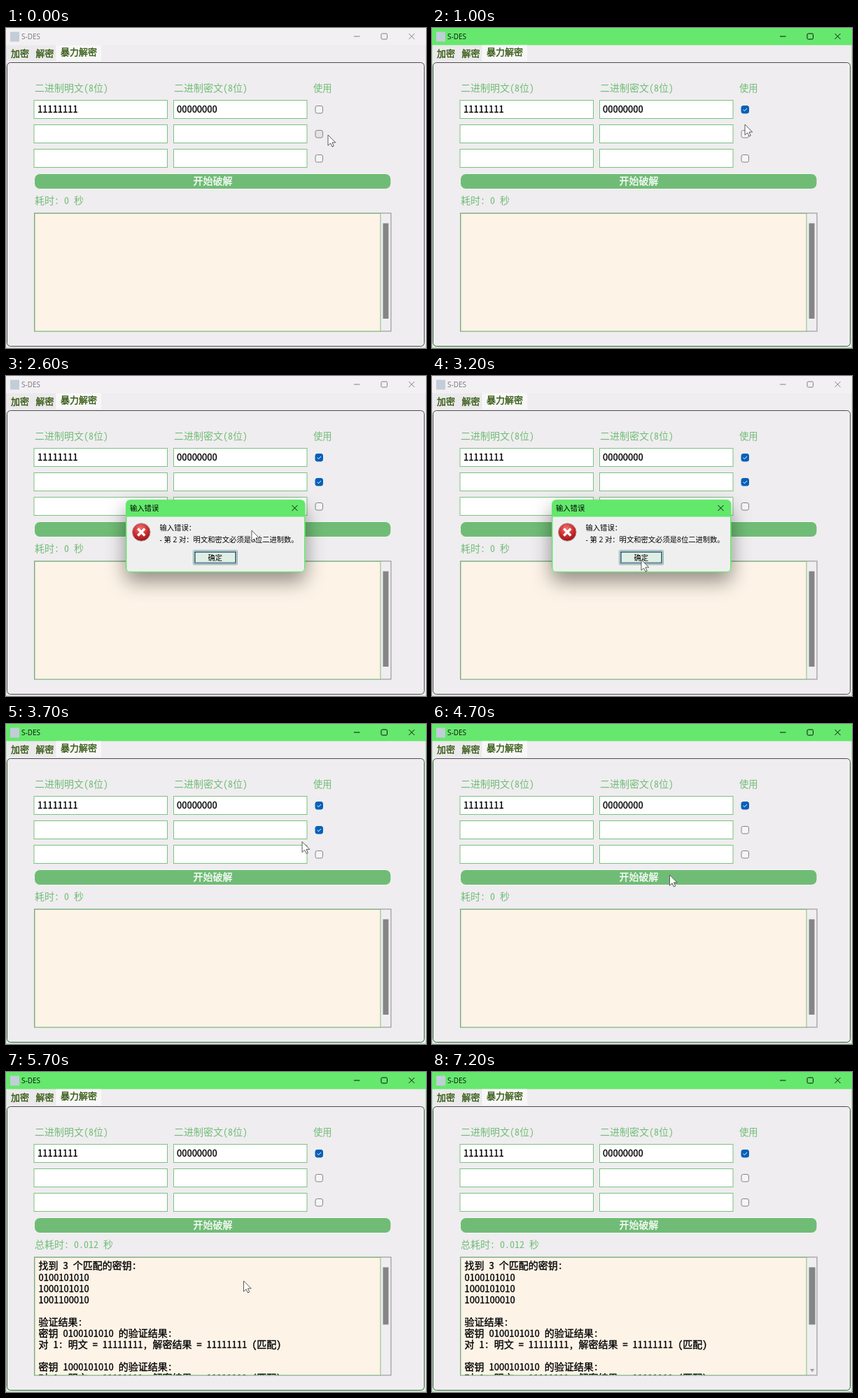
An HTML page for the animation above (7300 ms loop, 600x458 px).

```html
<!DOCTYPE html>
<html lang="zh">
<head>
<meta charset="utf-8">
<title>S-DES</title>
<style>
html, body { margin: 0; width: 100%; height: 100%; overflow: hidden; background: #efedef; }
svg { display: block; width: 100vw; height: 100vh; }
text { white-space: pre; font: 400 14px "Noto Sans Mono CJK SC", "Noto Sans CJK SC", "Noto Sans CJK", monospace; }
.digits { font-family: "Noto Sans CJK SC", "Noto Sans CJK", sans-serif; font-size: 13px; }
.label { fill: #72bd78; }
.tab { font-size: 13px; fill: #355a14; stroke: #355a14; stroke-width: .4; }
.strong { stroke: #000; stroke-width: .35; }
.ui { font: 10.3px "Open Sans", "Noto Sans CJK SC", "Noto Sans CJK", sans-serif; }
.line { fill: none; stroke-width: 1; }
</style>
</head>
<body>
<svg viewBox="0 0 600 458" preserveAspectRatio="none">
  <defs>
    <clipPath id="view"><rect x="41" y="266" width="494" height="167.5"/></clipPath>
    <radialGradient id="red" cx=".45" cy=".3" r=".75">
      <stop offset="0" stop-color="#ee7672"/><stop offset=".55" stop-color="#cf2b2d"/><stop offset="1" stop-color="#8e1116"/>
    </radialGradient>
    <filter id="shadow" x="-30%" y="-40%" width="160%" height="220%">
      <feDropShadow dx="0" dy="13" stdDeviation="14" flood-color="#000" flood-opacity=".42"/>
    </filter>
  </defs>
  <rect width="600" height="458" fill="#efedef"/>
  <rect id="bar" width="600" height="24.5"/>
  <path id="edge" class="line" d="M.25 24V457.5H599.75V24" stroke-opacity=".6"/>
  <rect x="6" y="5.5" width="13" height="14" fill="#c3cdd8"/>
  <text id="caption" class="ui" x="22" y="16" style="font-size:10px">S-DES</text>
  <path id="controls" class="line" d="M497 12H505.5M575.5 8L583.5 16M583.5 8L575.5 16M537.5 8H543Q544.5 8 544.5 9.5V14.5Q544.5 16 543 16H537.5Q536 16 536 14.5V9.5Q536 8 537.5 8Z"/>

  <rect x="1" y="25" width="70" height="22" fill="#ebe9eb"/>
  <rect x="71.5" y="24.5" width="64.5" height="23" fill="#f8f7f8"/>
  <text class="tab" x="7" y="40.5">加密</text>
  <text class="tab" x="42.5" y="40.5">解密</text>
  <text class="tab" x="78" y="39">暴力解密</text>
  <rect class="line" x="1.5" y="49.5" width="596" height="406" rx="5" stroke="#4c4c4c"/>

  <text class="label" x="41" y="91">二进制明文(8位)</text>
  <text class="label" x="240" y="91">二进制密文(8位)</text>
  <text class="label" x="439" y="91" style="font-size:13.3px">使用</text>
  <g id="rows"></g>
  <text class="strong" x="45" y="120.7"><tspan class="digits">11111111</tspan></text>
  <text class="strong" x="244" y="120.7"><tspan class="digits">00000000</tspan></text>

  <rect id="crack" x="40.5" y="208.5" width="509.5" height="22" rx="8" stroke="#f8f8f8"/>
  <text x="267.5" y="224" fill="#fff" stroke="#fff" stroke-width=".3">开始破解</text>
  <text id="cost" class="label" x="41" y="252"></text>

  <rect x="40.5" y="265" width="509.5" height="169" fill="#f0eef0" stroke="#8b8b8b"/>
  <rect x="41" y="265.5" width="494" height="168.5" fill="#fdf3e7" stroke="#7cc182"/>
  <g clip-path="url(#view)"><g id="output"></g></g>
  <rect id="thumb" x="538.5" fill="#858585"/>
  <path id="down" d="M540 425H546.4L543.2 429.5Z" fill="#a0a0a0"/>

  <g id="dialog">
    <rect x="171" y="177" width="256.5" height="104" rx="6.5" fill="#62e86b" filter="url(#shadow)"/>
    <path d="M172.5 201.5H426V275Q426 279.7 421.5 279.7H177Q172.5 279.7 172.5 275Z" fill="#f0eff0"/>
    <text class="ui" x="177" y="192.7">输入错误</text>
    <path class="line" d="M408.5 185L416.5 193M416.5 185L408.5 193" stroke="#111"/>
    <circle cx="193.3" cy="223.5" r="12.8" fill="url(#red)" stroke="#a9a5a5"/>
    <path d="M188.3 218.5L198.3 228.5M198.3 218.5L188.3 228.5" stroke="#fff" stroke-width="3.4"/>
    <text class="ui" x="219.5" y="221">输入错误：</text>
    <text class="ui" x="219.5" y="238">- 第 2 对：明文和密文必须是8位二进制数。</text>
    <rect x="267.5" y="249.5" width="63" height="20.5" rx="1" fill="#e0efe5" stroke="#88aa95"/>
    <rect class="line" x="269.5" y="251.5" width="59" height="16.5" stroke="#2869a5"/>
    <rect class="line" x="270.5" y="252.5" width="57" height="14.5" stroke="#222" stroke-dasharray="1 1"/>
    <text class="ui" x="288.5" y="263.7">确定</text>
  </g>
  <path id="cursor" d="M0 0V15.2L3.6 11.9L6 17L8.3 16L6 10.9H10.8Z" fill="#fff" stroke="#4a4a4a" stroke-width=".9"/>
</svg>
<script>
const LOOP = 7300, STEP = 100, LINE = 16.1, MAX_SCROLL = 96;
const $ = id => document.getElementById(id);
const set = (el, attrs) => { for (const k in attrs) el.setAttribute(k, attrs[k]); };
const show = (el, on) => set(el, { visibility: on ? 'visible' : 'hidden' });
function add(parent, tag, attrs, text = '') {
  const el = document.createElementNS('http://www.w3.org/2000/svg', tag);
  set(el, attrs);
  el.textContent = text;
  parent.append(el);
  return el;
}
const within = (t, a, b) => t >= a && t < b;

// time, x, y of the pointer
const path = [
  [100, 460, 153], [500, 448, 118], [900, 447, 120], [1000, 447, 138], [1200, 447, 142],
  [1300, 447, 142], [1400, 447, 149], [1700, 447, 150], [2100, 351, 221], [2600, 351, 221],
  [2900, 299, 263], [3400, 299, 263], [3800, 446, 151], [4100, 446, 151], [4500, 339.5, 216],
  [5300, 339.5, 216], [5600, 339.5, 299], [6300, 339.5, 299], [6700, 542, 350], [6900, 556, 410],
  [7100, 558, 470]
];
function pointer(t) {
  const i = path.findIndex(p => p[0] > t);
  if (i === 0) return path[0].slice(1);
  if (i < 0) return path[path.length - 1].slice(1);
  const [t0, x0, y0] = path[i - 1], [t1, x1, y1] = path[i];
  const u = (t - t0) / (t1 - t0), e = u * u * (3 - 2 * u);
  return [x0 + (x1 - x0) * e, y0 + (y1 - y0) * e];
}

const boxes = [0, 1, 2].map(i => {
  const y = 103.5 + 35 * i;
  for (const x of [40, 239.5])
    add($('rows'), 'rect', { x, y, width: 190.5, height: 26, fill: '#fff', stroke: '#7cc182' });
  const box = add($('rows'), 'rect', { x: 442, y: y + 8, width: 10.5, height: 10.5, rx: 2.5 });
  const tick = add($('rows'), 'path', {
    class: 'line', stroke: '#fff', d: `M444.6 ${y + 13.4}L446.5 ${y + 15.2}L450 ${y + 11.6}`
  });
  return { box, tick, mid: y + 13 };
});

const keys = ['0100101010', '1000101010', '1001100010'];
const lines = ['找到 3 个匹配的密钥:', ...keys, '', '验证结果:'];
for (const k of keys)
  lines.push(`密钥 ${k} 的验证结果:`, '对 1: 明文 = 11111111, 解密结果 = 11111111 (匹配)', '');
// digits are set in their own face
lines.forEach((s, i) => {
  const row = add($('output'), 'text', { class: 'strong', x: 46.5, y: 282.4 + LINE * i });
  for (const run of s.split(/(\d+)/).filter(Boolean))
    add(row, 'tspan', /\d/.test(run) ? { class: 'digits' } : {}, run);
});

function render(t) {
  const [x, y] = pointer(t);
  const active = within(t, 600, 2600) || t >= 3400;
  const done = t >= 4900;
  const checked = [t >= 700, within(t, 1500, 4000), false];
  const pressed = within(t, 2200, 2600) || within(t, 4800, 4900);

  set($('bar'), { fill: active ? '#65e86d' : '#f3f0f3' });
  set($('edge'), { stroke: active ? '#65e86d' : '#d2d0d2' });
  set($('caption'), { fill: active ? '#111' : '#777' });
  set($('controls'), { stroke: active ? '#111' : '#808080' });

  boxes.forEach(({ box, tick, mid }, i) => {
    const over = Math.abs(x - 450) < 13 && Math.abs(y - mid) < 12;
    const on = checked[i];
    set(box, {
      fill: on ? (over ? '#1a70c0' : '#0560b8') : over ? '#e5e3e5' : '#f6f5f6',
      stroke: on ? '#0560b8' : '#858585'
    });
    show(tick, on);
  });

  set($('crack'), { fill: pressed ? '#bdbbbd' : '#70bc76' });
  $('cost').textContent = done ? '总耗时: 0.012 秒' : '耗时: 0 秒';

  // the wheel scrolls three lines per notch
  const notches = t < 5500 ? 0 : Math.floor((t - 5400) / STEP);
  const scroll = Math.max(0, MAX_SCROLL - notches * LINE * 3);
  const hovered = t >= 6700;
  show($('output'), done);
  set($('output'), { transform: `translate(0 ${-scroll})` });
  set($('thumb'), {
    y: 279.5 + (done ? 54.5 * scroll / MAX_SCROLL : 0),
    height: done ? 82 : 136.5,
    width: hovered ? 9 : 8
  });
  show($('down'), hovered);

  show($('dialog'), within(t, 2600, 3400));
  set($('cursor'), { transform: `translate(${x} ${y})` });
}

const start = performance.now();
function tick() {
  const t = (performance.now() - start) % LOOP;
  render(Math.floor(t / STEP) * STEP);
  requestAnimationFrame(tick);
}
tick();
</script>
</body>
</html>
```
